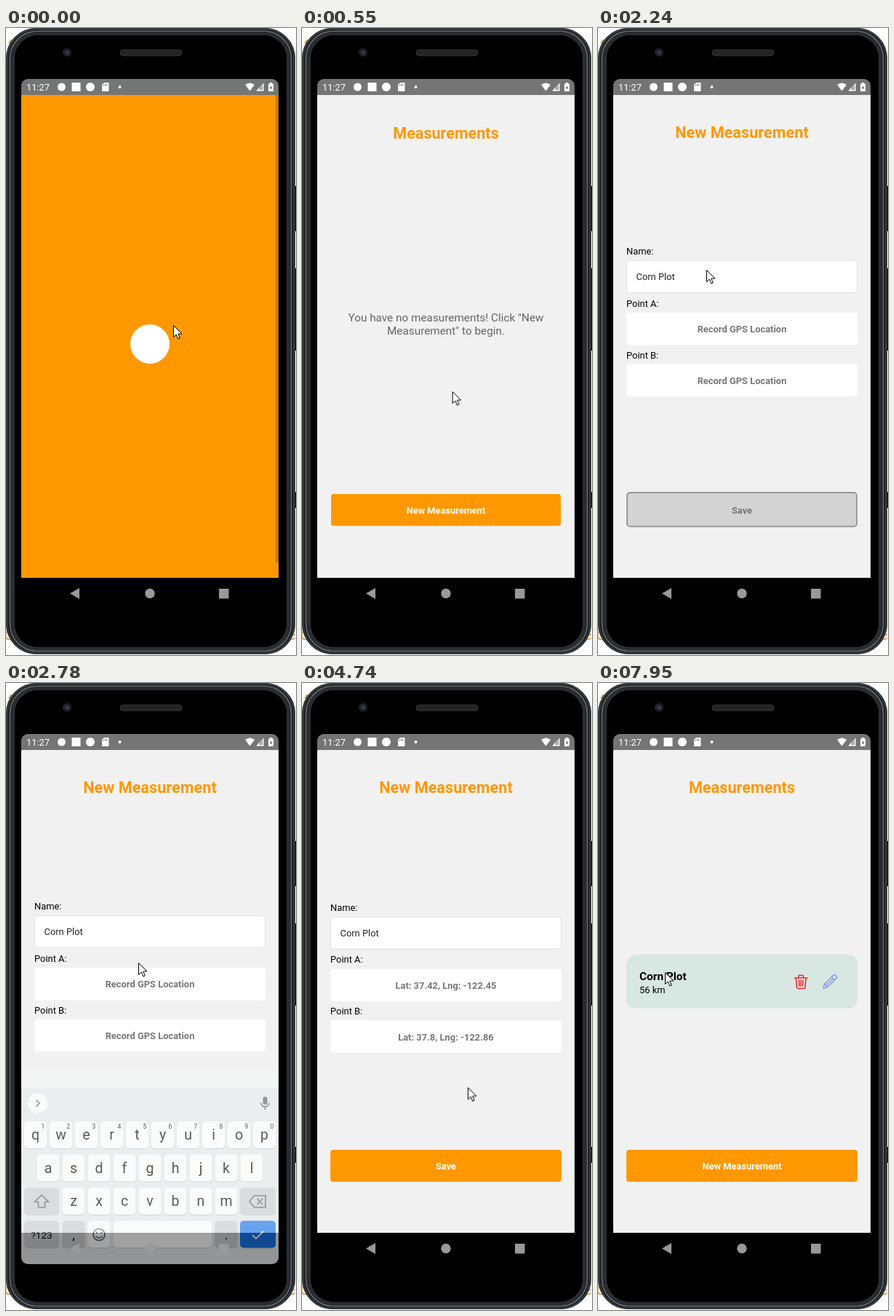
Animation of 399x861 px, one loop 8000 ms. Source, as an HTML page:

```html
<!DOCTYPE html>
<html lang="en">
<head>
<meta charset="utf-8">
<title>Measurements app</title>
<style>
html, body { margin: 0; width: 100%; height: 100%; overflow: hidden; background: #fff; }
svg { display: block; width: 399px; height: 861px; font: 12.9px Roboto, sans-serif; }
.mid { text-anchor: middle; }
.bold { font-weight: 700; }
.title { font-size: 21.7px; font-weight: 700; fill: #ff9800; text-anchor: middle; }
.label { font-weight: 700; text-anchor: middle; fill: #fff; }
.rec { font-weight: 700; text-anchor: middle; fill: #777; }

.fade, .zoom, #splash-bar, #shift, #kbd, #icons, #cursor { animation: 8s linear infinite; }
.zoom { transform-origin: 198px 423px; animation-timing-function: cubic-bezier(.35, .45, 0, 1); }
#splash-bar { animation-name: bar; }
#splash .zoom { animation-name: splash-zoom; }
#home.fade { animation-name: home-fade; }
#home .zoom { animation-name: home-zoom; }
#form.fade { animation-name: form-fade; }
#form .zoom { animation-name: form-zoom; }
#shift { animation-name: shift; animation-timing-function: step-end; }
#kbd { animation-name: kbd; }
#icons { animation-name: icons; }
#cursor { animation-name: cursor; }

@keyframes bar { 0%, 3.375% { opacity: 1 } 4.6%, 100% { opacity: 0 } }
@keyframes splash-zoom { 0%, 3.71% { transform: scale(1) } 8.71%, 100% { transform: scale(1.15) } }
@keyframes home-fade {
  0%, 4.375% { opacity: 0 } 5.125% { opacity: .15 } 6% { opacity: .45 } 6.875%, 100% { opacity: 1 }
}
@keyframes home-zoom {
  0%, 3.71% { transform: scale(.85) } 8.71%, 11.625% { transform: scale(1) }
  16.25% { transform: scale(1.15) } 17%, 69.75% { transform: scale(1.1) }
  73.5%, 100% { transform: scale(1) }
}
@keyframes form-fade {
  0%, 12.25% { opacity: 0 } 13% { opacity: .18 } 13.8% { opacity: .46 }
  14.625%, 69.9% { opacity: 1 } 71.25%, 100% { opacity: 0 }
}
@keyframes form-zoom {
  0%, 11.625% { transform: scale(.85) } 16.25%, 69.75% { transform: scale(1) }
  73.5%, 100% { transform: scale(.9) }
}
@keyframes shift { 0% { transform: none } 53.375%, 100% { transform: translateY(1.7px) } }
@keyframes kbd {
  0%, 30.5% { opacity: 0; transform: none }
  32.25%, 34% { opacity: 1; transform: translateY(-26px) }
  34.75% { opacity: .64; transform: none }
  35.75%, 100% { opacity: 0; transform: none }
}
@keyframes icons { 0%, 70% { opacity: .4 } 72% { opacity: .5 } 78%, 100% { opacity: 1 } }
@keyframes cursor {
  0%, 6% { transform: translate(230px, 408px) }
  8.625%, 15.5% { transform: translate(161px, 677px) }
  20.625%, 23.8% { transform: translate(133px, 324px) }
  23.875%, 30.5% { transform: translate(149px, 332px) }
  34.6%, 41.375% { transform: translate(182px, 384px) }
  42.25%, 46.5% { transform: translate(167px, 399px) }
  50.875%, 58.4% { transform: translate(233px, 496px) }
  59.25% { transform: translate(228px, 555px) }
  65.25%, 74% { transform: translate(178px, 655px) }
  79.75%, 80.2% { transform: translate(266px, 578px) }
  87.625%, 96% { transform: translate(206px, 665px) }
  99.375%, 100% { transform: translate(92px, 397px) }
}
</style>
</head>
<body>
<svg viewBox="0 0 399 861">
  <defs>
    <clipPath id="app"><path d="M21 92H375V755H21Z"/></clipPath>
    <clipPath id="glass"><rect x="21" y="70" width="354" height="728" rx="9"/></clipPath>
  </defs>

  <g fill="#b8812e" font-size="16">
    <text x="3" y="29">f</text><text x="-2" y="840">C</text><text x="390" y="840">c</text>
  </g>

  <!-- phone body -->
  <rect width="398" height="860" rx="42" fill="#17191b"/>
  <path d="M397 217h2v62h-2zM397 330h2v113h-2zM397 637h2v22h-2z"/>
  <g fill="none">
    <rect x="1.5" y="1.5" width="395" height="857" rx="40" stroke="#33373a" stroke-width="3"/>
    <rect x="5.5" y="4.5" width="387" height="851" rx="37" stroke="#6a6f73" stroke-width="1.6"/>
    <rect x="9.5" y="7.5" width="379" height="845" rx="34" stroke="#2a2d30" stroke-width="5"/>
  </g>
  <rect x="12" y="10" width="374" height="840" rx="32"/>
  <rect x="157" y="30" width="85" height="8" rx="4" fill="#242424" stroke="#343434"/>
  <circle cx="84" cy="33.5" r="6" fill="#1e2024"/>
  <circle cx="84" cy="33.5" r="2.6" fill="#363c58"/>

  <!-- status bar -->
  <path d="M21 92V79a9 9 0 0 1 9-9H366a9 9 0 0 1 9 9V92Z" fill="#757575"/>
  <g fill="#fff">
    <text x="28" y="86">11:27</text>
    <circle cx="76.5" cy="81" r="5.5"/>
    <rect x="90.5" y="75" width="12" height="12"/>
    <circle cx="116" cy="81" r="6"/>
    <path d="M135 75h5.500q1 0 1 1v10q0 1-1 1h-7.500q-1 0-1-1v-8z"/>
    <path d="M134.500 77.500v2M136.700 76.500v3M138.900 76.500v3" stroke="#757575"/>
    <circle cx="156.500" cy="81" r="2"/>
    <path d="M329 78q6.500-5 13 0l-6.500 8.500zM344 86.500 354.500 75.500V86.500Z"/>
    <path d="M361 76.500h2v-1.500h3v1.500h2v10.500h-7z"/>
  </g>
  <path d="M348.500 82.500l4.500-4.700v7.200h-4.500z" fill="#a5a5a5"/>
  <path d="M363.200 80.500h2.600v3h-2.600z" fill="#757575"/>

  <g clip-path="url(#app)">
    <g id="splash">
      <path d="M21 92H375V755H21Z" fill="#ff9800"/>
      <path id="splash-bar" d="M371 92h4v642h-4z" fill="#000" fill-opacity=".2"/>
      <circle class="zoom" cx="198" cy="434" r="27" fill="#fff"/>
    </g>

    <g id="home" class="fade">
      <path d="M21 92H375V755H21Z" fill="#f1f1f1"/>
      <g class="zoom">
        <text class="title" x="198" y="150.500">Measurements</text>
        <g class="mid" font-size="15.4" fill="#666" data-show="0 1340">
          <text x="198" y="403">You have no measurements! Click "New</text>
          <text x="198" y="420.700">Measurement" to begin.</text>
        </g>
        <g data-show="1340 8000">
          <rect x="39" y="373" width="318" height="74" rx="13" fill="#d9e7e3"/>
          <text class="bold" x="57" y="407.500" font-size="15.4">Corn Plot</text>
          <text x="57" y="426">56 km</text>
          <g id="icons" fill="none" stroke-width="1.6" stroke-linejoin="round" stroke-linecap="round">
            <path stroke="#ee2b2b" d="M270.500 405h17.500M275.500 405l1-3.500h5.500l1 3.500M272.300 405l1.200 13q.2 1.500 1.700 1.500h8.100q1.500 0 1.700-1.500l1.200-13M276.600 408.500l.3 7.500M279.300 408.500v7.500M282 408.500l-.3 7.500"/>
            <path stroke="#86a0e2" d="M310 419.300l1.500-5.800 12.300-12.300q1.300-1.200 2.600 0l1.600 1.600q1.200 1.300 0 2.600l-12.300 12.300zM321.300 403.700l4.200 4.200M311.500 413.500l4.200 4.200M314.500 414.700l8-8"/>
          </g>
        </g>
        <rect x="39" y="641" width="318" height="44" rx="4" fill="#ff9800"/>
        <text class="label" x="198" y="668">New Measurement</text>
      </g>
    </g>

    <g id="form" class="fade">
      <path d="M21 92H375V755H21Z" fill="#f1f1f1"/>
      <g class="zoom">
        <text class="title" x="198" y="150.500">New Measurement</text>
        <g id="shift">
          <text x="39" y="311">Name:</text>
          <rect x="39.500" y="319.500" width="317" height="44" rx="4" fill="#fff" stroke="#e2e2e2"/>
          <text x="52.500" y="346" fill="#bbb" data-show="0 2170">Name of measurement *</text>
          <text x="52.500" y="346" fill="#222" data-show="2170 2240">Corn</text>
          <text x="52.500" y="346" fill="#222" data-show="2240 8000">Corn Plot</text>
          <text x="39" y="382.500">Point A:</text>
          <rect x="39" y="391" width="318" height="44.500" rx="4" fill="#fff"/>
          <text class="rec" x="198" y="418" data-show="0 3310">Record GPS Location</text>
          <text class="rec" x="198" y="418" data-show="3310 8000">Lat: 37.42, Lng: -122.45</text>
          <text x="39" y="453.500">Point B:</text>
          <rect x="39" y="461.500" width="318" height="44.500" rx="4" fill="#fff"/>
          <text class="rec" x="198" y="489" data-show="0 4270">Record GPS Location</text>
          <text class="rec" x="198" y="489" data-show="4270 8000">Lat: 37.8, Lng: -122.86</text>
        </g>
        <g data-show="0 4270">
          <rect x="40" y="638" width="316" height="46.500" rx="4" fill="#d3d3d3" stroke="#999" stroke-width="2"/>
          <text class="rec" x="198" y="667">Save</text>
        </g>
        <g data-show="4270 8000">
          <rect x="39" y="641" width="318" height="44" rx="4" fill="#ff9800"/>
          <text class="label" x="198" y="668">Save</text>
        </g>
      </g>
    </g>
    <path d="M21 530H375V755H21Z" fill="#f2f5f4" data-show="2440 2860"/>
  </g>

  <g clip-path="url(#glass)"><g id="kbd"></g></g>

  <g fill="#999">
    <path d="M88 776.500 101 769V784Z"/>
    <circle cx="198" cy="776.500" r="6.700"/>
    <path d="M293 770h13.500v13.500h-13.500z"/>
  </g>

  <path id="cursor" d="M.5.5V16.500L4.300 13 6.800 19 9.300 18 6.800 12H12Z" fill="#fff" stroke="#000"/>
</svg>
<script>
const LOOP = 8000;

const key = (x, y, w, fill = '#fff') =>
  `<rect x="${x}" y="${y + 1}" width="${w}" height="37" rx="5" fill="#c3c6ca"/>` +
  `<rect x="${x}" y="${y}" width="${w}" height="37" rx="5" fill="${fill}"/>`;
const label = (x, y, s, size = 19.500) =>
  `<text class="mid" x="${x}" y="${y}" font-size="${size}">${s}</text>`;
const line = d => `<path d="${d}" fill="none" stroke="#5f6368" stroke-width="1.700"/>`;

function keyboard() {
  const grey = '#ccd0d5';
  let out = '<path d="M21 556H375V830H21Z" fill="#e8eaed"/>';
  [['qwertyuiop', 25, 602], ['asdfghjkl', 42.500, 647.500], ['zxcvbnm', 77.500, 693]].forEach(([row, x0, y], r) =>
    [...row].forEach((c, i) => {
      const x = x0 + i * 35;
      out += key(x, y, 31) + label(x + 15.500, y + 25, c);
      if (!r) out += label(x + 26, y + 10, (i + 1) % 10, 8.500);
    }));
  out += key(25, 693, 48, grey) + key(322, 693, 49, grey);
  out += key(25, 738.500, 48, grey) + label(49, 763, '?123', 13.500);
  out += key(77.500, 738.500, 31, grey) + label(93, 764, ',', 18);
  out += key(112.500, 738.500, 31) + key(147.500, 738.500, 136);
  out += key(287.500, 738.500, 31, grey) + label(303, 764, '.', 18);
  out += key(322, 738.500, 49, '#1a73e8');
  out += '<circle cx="43.500" cy="577" r="13.500" fill="#fff"/>';
  out += line('M41.500 572.500l4.500 4.500-4.500 4.500');
  out += '<rect x="353.500" y="568" width="6" height="11" rx="3" fill="#5f6368"/>';
  out += line('M351 576.500a5.500 5.500 0 0 0 11 0M356.500 582v4');
  out += line('M49 703l-9.500 9.500h5v7.500h9v-7.500h5z');
  out += line('M335 712l6.500-8h15.500v16h-15.500zM345.500 708l7.500 8M353 708l-7.500 8');
  out += line('M136 757.500a8 8 0 1 1-16 0a8 8 0 1 1 16 0M123.500 759.500q4.500 5 9 0M125 753.500v2.500M131 753.500v2.500');
  out += '<path d="M339 758l5 5 10-10" fill="none" stroke="#fff" stroke-width="1.800"/>';
  return out;
}
document.getElementById('kbd').innerHTML = keyboard();

// data-show="from to" (ms): hard switch on and off
document.querySelectorAll('[data-show]').forEach(el => {
  const [from, to] = el.dataset.show.split(' ').map(Number);
  const at = (ms, opacity) => ({ offset: ms / LOOP, opacity, easing: 'step-end' });
  el.animate([at(0, 0), at(from, 1), at(to, 0), at(LOOP, 0)], { duration: LOOP, iterations: Infinity });
});

// one shared clock for every part
const start = document.timeline.currentTime || 0;
document.getAnimations().forEach(a => { a.startTime = start; });
</script>
</body>
</html>
```
